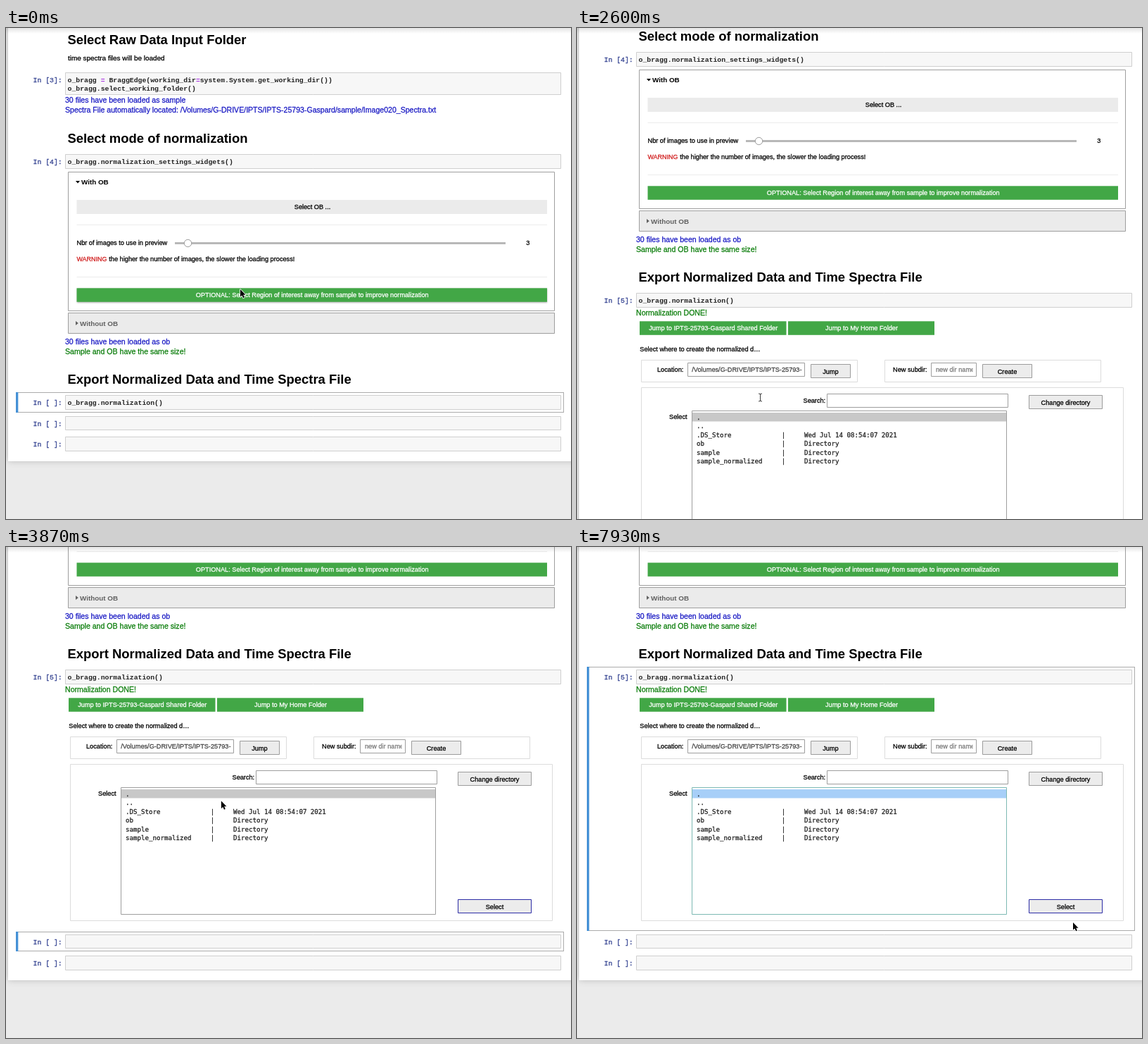
Write an HTML page with a canvas that moves like this. It is 803 by 697 pixels and loops after 8000 ms.

```html
<!DOCTYPE html>
<html lang="en">
<head>
<meta charset="utf-8">
<title>Notebook normalization</title>
<style>
html, body { margin: 0; width: 100%; height: 100%; overflow: hidden; background: #ebebeb; }
canvas { display: block; width: 803px; height: 697px; }
</style>
</head>
<body>
<canvas id="stage" width="803" height="697"></canvas>
<script>
const W = 803, H = 697, LOOP = 8000, STEP = 1000 / 15;
const c = document.getElementById('stage').getContext('2d');

const SANS = '"Liberation Sans", Arial, sans-serif';
const MONO = '"Liberation Mono", monospace';
const LIST = '"DejaVu Sans Mono", monospace';
const GREEN = '#42a746', BLUE = '#1b1bc4', NAVY = '#303f8f', OK = '#0b7d0b';

// Moments of state changes
const CLICK_CELL = 860, CARET_OFF = 1390, CARET_ON = 1925, RUN = 1990, DONE = 2125;
const TO_BEAM = 925, TO_ARROW = 3060, CLICK_LIST = 6060;

const pointer = [
  [0, 333, 371], [67, 333, 371], [667, 272, 539], [800, 272, 539],
  [1067, 251.5, 530.5], [1867, 251.5, 530.5], [2333, 260.5, 524.5], [3333, 260.5, 524.5],
  [3867, 306, 360.5], [4200, 592, 430], [4533, 690, 508], [4800, 690, 508],
  [5200, 480, 391], [5667, 199, 354], [5733, 191, 353], [5800, 191, 353],
  [5933, 190, 349], [6133, 190, 349], [6900, 205, 228], [7733, 698, 546],
  [7933, 705, 533], [8000, 705, 533]
];
const scroll = [
  [0, 0], [2400, 0], [2467, 1], [2533, 40], [2600, 145], [2667, 246],
  [2733, 306], [2800, 336], [2867, 347], [8000, 347]
];

// Smooth curve through keys; stands still where neighbouring keys agree
function along(keys, t, k) {
  let i = 0;
  while (i < keys.length - 2 && t >= keys[i + 1][0]) i++;
  const slope = j => {
    const p = keys[j - 1], q = keys[j], n = keys[j + 1];
    if (!p || !n || p[k] === q[k] || n[k] === q[k]) return 0;
    return (n[k] - p[k]) / (n[0] - p[0]);
  };
  const a = keys[i], b = keys[i + 1], d = b[0] - a[0];
  const u = Math.min(1, (t - a[0]) / d), u2 = u * u, u3 = u2 * u;
  return a[k] * (2 * u3 - 3 * u2 + 1) + b[k] * (3 * u2 - 2 * u3) +
    d * (slope(i) * (u3 - 2 * u2 + u) + slope(i + 1) * (u3 - u2));
}

// y is the middle of the capitals; a hairline stroke gives the heavier stems
function text(s, x, y, size = 9.2, color = '#000', font = SANS, weight = '', align = 'left') {
  c.font = `${weight} ${size}px ${font}`;
  c.fillStyle = c.strokeStyle = color;
  c.textAlign = align;
  const base = y + size * 0.36;
  c.fillText(s, x, base);
  if (weight) return;
  c.lineWidth = 0.28;
  c.lineJoin = 'round';
  c.strokeText(s, x, base);
}
const label = (s, x, y, color) => text(s, x, y, 9.2, color);
const centered = (s, x, y, color) => text(s, x, y, 9.18, color, SANS, '', 'center');
const title = (s, y) => text(s, 87.4, y, 18.44, '#000', SANS, 'bold');
const output = (s, y, color) => text(s, 84, y, 10.57, color);
const code = (s, y, color = '#222', col = 0) =>
  text(s, 87.6 + col * 5.88, y, 9.8, color, MONO, 'bold');

function fill(x, y, w, h, color) {
  c.fillStyle = color;
  c.fillRect(x, y, w, h);
}
function box(x, y, x2, y2, bg, edge) {
  fill(x, y, x2 - x, y2 - y, bg);
  c.strokeStyle = edge;
  c.lineWidth = 1;
  c.strokeRect(x + 0.5, y + 0.5, x2 - x - 1, y2 - y - 1);
}
function shape(points, color) {
  c.beginPath();
  points.forEach(p => c.lineTo(p[0], p[1]));
  c.closePath();
  c.fillStyle = color;
  c.fill();
}
// Plate that casts a small shadow while the pointer is over it
function plate(x, y, x2, y2, color, m) {
  if (m.x >= x && m.x <= x2 && m.y >= y && m.y <= y2) {
    c.shadowColor = 'rgba(0,0,0,.3)';
    c.shadowBlur = 2;
    c.shadowOffsetY = 1;
  }
  fill(x, y, x2 - x, y2 - y, color);
  c.shadowColor = 'transparent';
  c.shadowBlur = c.shadowOffsetY = 0;
}

function input(y, y2, n, textY) {
  box(84, y, 789, y2, '#f7f7f7', '#cfcfcf');
  text(`In [${n}]:`, 38.6, textY, 9.8, NAVY, MONO);
}
function selection(y, y2, editing) {
  box(14, y, 793, y2, '#fff', editing ? '#63b166' : '#ababab');
  fill(14, y, 3.3, y2 - y, editing ? '#5bad5f' : '#4591d6');
}
function greenButton(x, y, x2, y2, s, m) {
  plate(x, y, x2, y2, GREEN, m);
  centered(s, (x + x2) / 2 + 0.5, (y + y2) / 2, '#fff');
}
function button(x, y, x2, y2, s, m, edge = '#9c9c9c') {
  plate(x, y, x2, y2, '#ececec', m);
  box(x, y, x2, y2, '#ececec', edge);
  centered(s, (x + x2) / 2, (y + y2) / 2 + 0.3);
}

function settings(m) {
  title('Select Raw Data Input Folder', 16);
  text('time spectra files will be loaded', 88, 42, 9.95);
  input(63, 95, 3, 73.5);
  code('o_bragg   BraggEdge(working_dir system.System.get_working_dir())', 73.5);
  code('=', 73.5, '#a32be0', 8);
  code('=', 73.5, '#a32be0', 31);
  code('o_bragg.select_working_folder()', 85.5);
  output('30 files have been loaded as sample', 102.5, BLUE);
  output('Spectra File automatically located: /Volumes/G-DRIVE/IPTS/IPTS-25793-Gaspard/sample/Image020_Spectra.txt', 116.5, BLUE);

  title('Select mode of normalization', 156);
  input(179, 200, 4, 189.5);
  code('o_bragg.normalization_settings_widgets()', 189.5);

  box(88, 204, 780, 402, '#fff', '#9e9e9e');
  shape([[99, 217], [105, 217], [102, 220.5]], '#000');
  text('With OB', 107, 218.5, 9.85, '#000', SANS, 'bold');
  fill(100.5, 244, 668.5, 20, '#ebebeb');
  centered('Select OB ...', 435.5, 254);
  fill(100.5, 279, 668.5, 1, '#ececec');
  label('Nbr of images to use in preview', 100.5, 305);
  fill(240, 304, 470, 3, '#b8b8b8');
  c.beginPath();
  c.arc(258.5, 305.5, 5.2, 0, Math.PI * 2);
  c.fillStyle = '#fff';
  c.fill();
  c.strokeStyle = '#999';
  c.lineWidth = 1;
  c.stroke();
  label('3', 739.3, 305);
  text('WARNING', 100.5, 327.5, 8.95, '#d01c1c');
  label('the higher the number of images, the slower the loading process!', 146.3, 327.5);
  fill(100.5, 353, 668.5, 1, '#ececec');
  greenButton(100.5, 369.3, 769, 388.8, 'OPTIONAL: Select Region of interest away from sample to improve normalization', m);

  box(88, 404, 780, 434, '#ebebeb', '#9e9e9e');
  shape([[99, 416], [102.8, 419], [99, 422]], '#616161');
  text('Without OB', 105, 419.3, 9.85, '#616161', SANS, 'bold');
  output('30 files have been loaded as ob', 445, BLUE);
  output('Sample and OB have the same size!', 459, OK);
  title('Export Normalized Data and Time Spectra File', 498.3);
}

function fileList(focused) {
  box(163, 688, 611, 869, '#fff', focused ? '#7db9b3' : '#9e9e9e');
  fill(164, 691, 446, 12.5, focused ? '#a7cff8' : '#c8c8c8');
  const rows = ['.', '..', '.DS_Store', 'ob', 'sample', 'sample_normalized'];
  rows.forEach((name, i) => {
    const y = 697.5 + i * 12.5;
    const put = (s, x) => text(s, x, y, 9.15, '#222', LIST);
    put(name, 170);
    if (i < 2) return;
    put('|', 290.8);
    put(i === 2 ? 'Wed Jul 14 08:54:07 2021' : 'Directory', 323);
  });
}

function results(m, focused) {
  output('Normalization DONE!', 548.7, OK);
  greenButton(89, 561.3, 297.5, 580.8, 'Jump to IPTS-25793-Gaspard Shared Folder', m);
  greenButton(300, 561.3, 508, 580.8, 'Jump to My Home Folder', m);
  label('Select where to create the normalized d…', 89.3, 601);

  box(91, 616, 399, 648, '#fff', '#dcdcdc');
  label('Location:', 114, 629.7);
  box(157, 620, 324, 640, '#fff', '#9e9e9e');
  label('/Volumes/G-DRIVE/IPTS/IPTS-25793-', 163.3, 629.7, '#444');
  button(332, 622, 389, 642, 'Jump', m);

  box(437, 616, 745, 648, '#fff', '#dcdcdc');
  label('New subdir:', 449, 629.7);
  box(503, 620, 568, 640, '#fff', '#9e9e9e');
  c.save();
  c.beginPath();
  c.rect(504, 621, 58.5, 18);
  c.clip();
  label('new dir name', 510, 629.7, '#7a7a7a');
  c.restore();
  button(576, 622, 647, 642, 'Create', m);

  box(91, 655, 777, 878, '#fff', '#dcdcdc');
  label('Search:', 321.5, 674);
  box(355, 664, 613, 684, '#fff', '#9e9e9e');
  button(642, 666, 747, 686, 'Change directory', m);
  label('Select', 131, 696.5);
  fileList(focused);
  button(642, 847, 747, 867, 'Select', m, '#2d2da6');
}

function arrow(x, y) {
  const pts = [[0, 0], [0, 10.6], [2.4, 8.4], [4.1, 12.3], [5.9, 11.5], [4.3, 7.7], [7.5, 7.7]];
  c.save();
  c.translate(x, y);
  c.lineJoin = 'round';
  shape(pts, '#000');
  c.strokeStyle = '#fff';
  c.lineWidth = 1.6;
  c.stroke();
  shape(pts, '#000');
  c.restore();
}
function beam(x, y) {
  c.save();
  c.translate(x, y);
  c.strokeStyle = '#222';
  c.lineWidth = 0.9;
  c.beginPath();
  c.moveTo(0, -5);
  c.lineTo(0, 5);
  for (const s of [-1, 1]) {
    c.moveTo(-2.4, s * 5.5);
    c.quadraticCurveTo(0, s * 5.5, 0, s * 4.3);
    c.quadraticCurveTo(0, s * 5.5, 2.4, s * 5.5);
  }
  c.stroke();
  c.restore();
}

function draw(t) {
  const top = along(scroll, t, 1);
  const x = along(pointer, t, 1), y = along(pointer, t, 2);
  const m = { x, y: y + top };
  const ran = t >= RUN, done = t >= DONE, listed = t >= CLICK_LIST;
  const editing = t >= CLICK_CELL && !ran;
  const grow = done ? 346 : 0;
  const last = done ? 347 : 0;
  const end = 615 + last;

  fill(0, 0, W, H, '#ebebeb');
  c.save();
  c.translate(0, -top);
  c.shadowColor = 'rgba(87,87,87,.32)';
  c.shadowBlur = 9;
  fill(3, -60, W + 40, end + 60, '#fff');
  c.shadowColor = 'transparent';
  c.shadowBlur = 0;

  if (!ran) selection(517, 546, editing);
  else if (listed) selection(517, 892, false);
  else selection(547 + grow, 575 + grow, false);

  settings(m);
  input(521, 542, done ? 5 : ran ? '*' : ' ', 531.5);
  code('o_bragg.normalization', 531.5);
  code('()', 531.5, editing ? '#16a016' : '#222', 21);
  if (editing && (t < CARET_OFF || t >= CARET_ON)) fill(223, 525, 1, 12, '#000');
  if (done) results(m, listed);
  input(551 + grow, 571 + grow, ' ', 561 + grow);
  input(580 + last, 601 + last, ' ', 590.5 + last);
  c.restore();

  const shade = c.createLinearGradient(0, 0, 0, 8);
  shade.addColorStop(0, 'rgba(87,87,87,.16)');
  shade.addColorStop(1, 'rgba(87,87,87,0)');
  fill(0, 0, W, 8, shade);

  if (t >= TO_BEAM && t < TO_ARROW) beam(x, y);
  else arrow(x, y);
}

function tick() {
  const t = performance.now() % LOOP;
  draw(Math.floor((t + 3.5) / STEP) * STEP % LOOP);
  requestAnimationFrame(tick);
}
tick();
</script>
</body>
</html>
```
